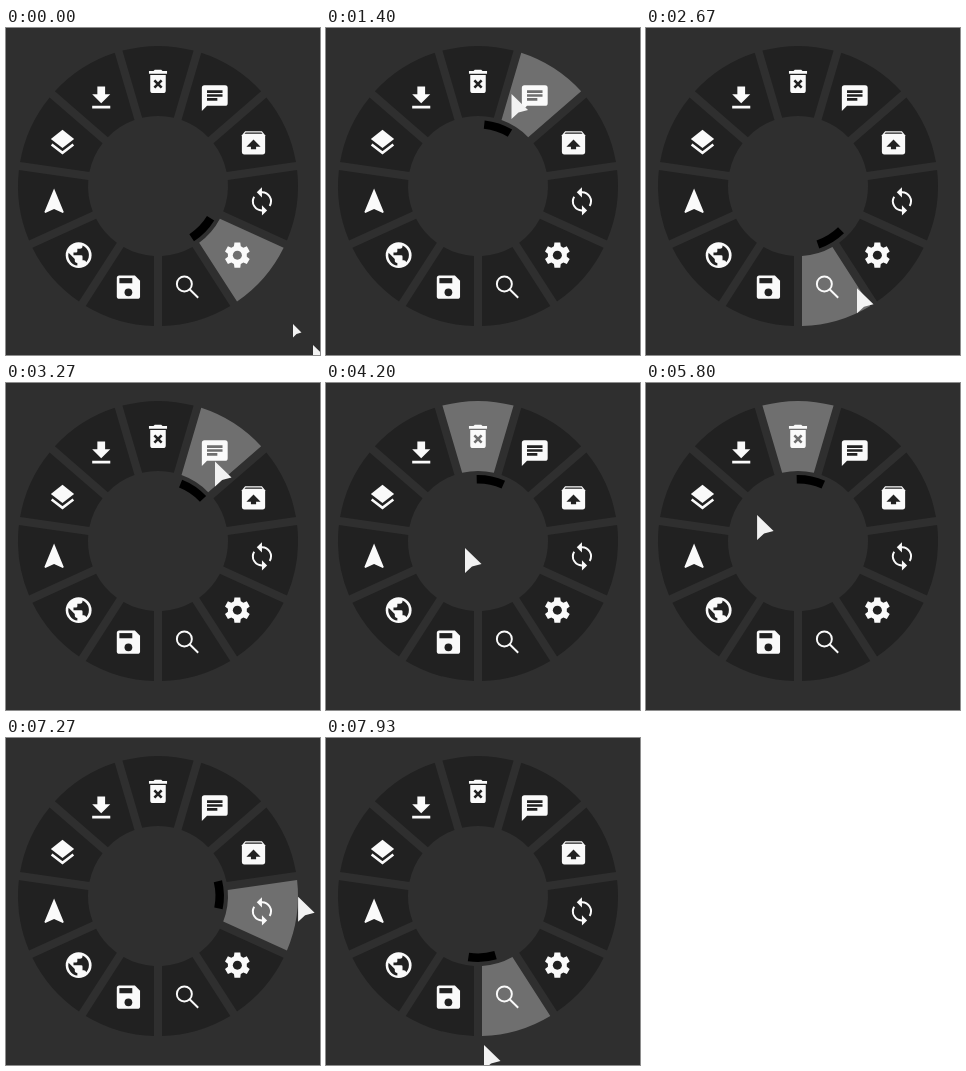
An HTML page for the animation above (8 s loop, 314 px wide and 327 px high).

```html
<!DOCTYPE html>
<html lang="en">
<head>
<meta charset="utf-8">
<title>Radial menu</title>
<style>
  html, body { margin: 0; width: 100%; height: 100%; overflow: hidden; background: #2f2f2f; }
  svg { display: block; width: 314px; height: 327px; }
  .item { --base: #212121; fill: #fafafa; }
  .item.hover { --base: #6f6f6f; }
  .sector, .cut { fill: var(--base); }
  .line { fill: none; stroke: #fafafa; stroke-width: 1.5; }
  .groove { fill: none; stroke: var(--base); stroke-width: 2; }
  .thick { stroke-width: 2; }
  .cursor { fill: #f2f2f2; }
</style>
</head>
<body>
<svg viewBox="0 0 314 327">
  <g id="menu"></g>
  <path id="pointer" fill="none" stroke="#000" stroke-width="8.5"/>
  <path id="small" class="cursor" d="M0 0V13.5L3.5 10 8.5 8.5Z"/>
  <path id="big" class="cursor" d="M0 0V25L7 18.5 16.5 16Z"/>
</svg>
<script>
const CX = 152, CY = 158, OUTER = 140, INNER = 70, HALF_GAP = 4;
const ICON_RADIUS = 105, ICON_SCALE = 31 / 24;
const LOOP = 8000, STEPS = 120, STEP = LOOP / STEPS;
const RAD = Math.PI / 180;

const polar = (r, deg, cx = CX, cy = CY) =>
  [cx + r * Math.cos(deg * RAD), cy + r * Math.sin(deg * RAD)];
const clamp = (v, lo, hi) => Math.min(Math.max(v, lo), hi);

// Icon parts on a 24 unit grid.
const solid = d => `<path d="${d}"/>`;
const cut = d => `<path class="cut" d="${d}"/>`;
const line = d => `<path class="line" d="${d}"/>`;
const groove = d => `<path class="groove" d="${d}"/>`;
const disc = (r, cls = '', x = 12, y = 12) => `<circle class="${cls}" cx="${x}" cy="${y}" r="${r}"/>`;

function gear() {
  const points = [];
  for (let a = -90; a < 270; a += 60)
    for (const [r, turn] of [[7.4, -21], [10, -13], [10, 13], [7.4, 21]])
      points.push(polar(r, a + turn, 12, 12));
  return solid(`M${points.join('L')}Z`) + disc(3.5, 'cut');
}

function sync() {
  const half = line('M11.5 5A7 7 0 0 1 18 15.6') + solid('M12 1 8 5l4 4z');
  return `${half}<g transform="rotate(180 12 12)">${half}</g>`;
}

// Clockwise from the top.
const icons = {
  trash: solid('M5 4h3.5l1-1h5l1 1H19v2H5zM6 7h12v12a2 2 0 0 1-2 2H8a2 2 0 0 1-2-2z') +
    groove('M9.2 11.2l5.6 5.6m0-5.6l-5.6 5.6'),
  chat: solid('M2 22V4a2 2 0 0 1 2-2h16a2 2 0 0 1 2 2v12a2 2 0 0 1-2 2H6z') +
    groove('M6 7h12M6 10h12M6 13h8'),
  unpack: solid('M5.5 3h13L21 6.2V19a2 2 0 0 1-2 2H5a2 2 0 0 1-2-2V6.2z') +
    cut('M5 5l.9-1h12.2l.9 1zM12 9.5l5.5 5.5H14v2h-4v-2H6.5z'),
  sync: sync(),
  settings: gear(),
  search: disc(5.8, 'line', 9.5, 9.5) + line('M13.6 13.6 20.2 20.2'),
  save: solid('M5 3h12l4 4v12a2 2 0 0 1-2 2H5a2 2 0 0 1-2-2V5a2 2 0 0 1 2-2z') +
    cut('M5 5h10v4H5z') + disc(3, 'cut', 12, 16),
  globe: disc(10) + cut('M11 20A8 8 0 0 1 4.2 10.2L9 15v1a2 2 0 0 0 2 2z') +
    cut('M17.9 17.4A2 2 0 0 0 16 16h-1v-3a1 1 0 0 0-1-1H8v-2h2a1 1 0 0 0 1-1V7h2a2 2 0 0 0 2-2v-.4A8 8 0 0 1 17.9 17.4z'),
  navigate: solid('M12 2 4.5 20.3l.7.7L12 18l6.8 3 .7-.7z'),
  layers: solid('M12 2l9 7-9 7-9-7z') + '<path class="line thick" d="M3.6 13.3l8.4 6.5 8.4-6.5"/>',
  download: solid('M9 3h6v6h4l-7 7-7-7h4zM5 18h14v2H5z')
};
const COUNT = Object.keys(icons).length, SLICE = 360 / COUNT;

function sectorPath(mid) {
  const half = r => SLICE / 2 - Math.asin(HALF_GAP / r) / RAD;
  const o = half(OUTER), i = half(INNER);
  return `M${polar(OUTER, mid - o)}A${OUTER} ${OUTER} 0 0 1 ${polar(OUTER, mid + o)}` +
         `L${polar(INNER, mid + i)}A${INNER} ${INNER} 0 0 0 ${polar(INNER, mid - i)}Z`;
}

const [menu, pointer, small, big] =
  ['menu', 'pointer', 'small', 'big'].map(id => document.getElementById(id));

menu.innerHTML = Object.values(icons).map((icon, i) => {
  const mid = -90 + i * SLICE, [x, y] = polar(ICON_RADIUS, mid);
  return `<g class="item"><path class="sector" d="${sectorPath(mid)}"/>` +
    `<g transform="translate(${x} ${y + 0.4}) scale(${ICON_SCALE}) translate(-12 -12)">${icon}</g></g>`;
}).join('');
const items = [...menu.children];

pointer.setAttribute('d', `M${polar(61.7, -12.7)}A61.7 61.7 0 0 1 ${polar(61.7, 12.7)}`);

// Smooth curve through keys of the form [step, a, b].
function spline(keys, step) {
  const last = keys.length - 1;
  const i = clamp(keys.findIndex(k => k[0] >= step) - 1, 0, last - 1);
  const [p, q] = [keys[i], keys[i + 1]], span = q[0] - p[0], u = (step - p[0]) / span;
  const slope = (n, axis) => {
    const before = keys[Math.max(n - 1, 0)], after = keys[Math.min(n + 1, last)];
    return (after[axis] - before[axis]) / (after[0] - before[0]);
  };
  return [1, 2].map(axis =>
    p[axis] + (q[axis] - p[axis]) * u * u * (3 - 2 * u) +
    span * u * (1 - u) * ((1 - u) * slope(i, axis) - u * slope(i + 1, axis)));
}

// Orbits are step, angle, radius; the hub drift is step, x, y.
const SWEEP = 8, ENTER = 52, LEAVE = 87;
const orbitLeft = [[7, 46, 201], [11, 38, 150], [21, -70, 98], [40, -300, 118], [46, -387, 115], [52, -437, 76]];
const hubDrift = [[52, 169, 84], [56, 150, 150], [63, 139, 165], [71, 150, 153], [77, 158, 158], [82, 143, 158], [87, 111, 132]];
const orbitRight = [[87, -147.5, 48.5], [90, -142, 78], [100, -76, 156.5], [110, 9, 139], [119, 87.7, 149]];

const creep = step => 4.5 * Math.min(step, 2) + 1.5 * clamp(step - 3, 0, 2);

function tipAt(step) {
  if (step < SWEEP) return [307 - 1.33 * creep(step), 317 - 1.08 * creep(step)];
  if (step > ENTER && step < LEAVE) return spline(hubDrift, step);
  const [angle, radius] = spline(step <= ENTER ? orbitLeft : orbitRight, step);
  return polar(radius, angle);
}

// The aim keeps its last direction while the cursor is inside the hub.
let aim = 45;
const poses = Array.from({ length: STEPS }, (_, step) => {
  const tip = tipAt(step), dx = tip[0] - CX, dy = tip[1] - CY;
  if (Math.hypot(dx, dy) > INNER) aim = Math.atan2(dy, dx) / RAD;
  return { tip, aim, hover: Math.round((aim + 450) / SLICE) % COUNT };
});

const moveTo = (el, x, y) =>
  el.setAttribute('transform', `translate(${x.toFixed(1)} ${y.toFixed(1)})`);

function draw(ms) {
  const step = Math.floor((ms % LOOP + 4) / STEP) % STEPS;
  const { tip, aim, hover } = poses[step];
  items.forEach((item, i) => item.classList.toggle('hover', i === hover));
  pointer.setAttribute('transform', `rotate(${aim - 1.5} ${CX} ${CY})`);
  moveTo(big, ...tip);
  moveTo(small, 287 - creep(step), 296 - 0.75 * creep(step));
  small.style.display = step < SWEEP ? '' : 'none';
}

const start = performance.now();
function tick() {
  draw(performance.now() - start);
  requestAnimationFrame(tick);
}
tick();
</script>
</body>
</html>
```
